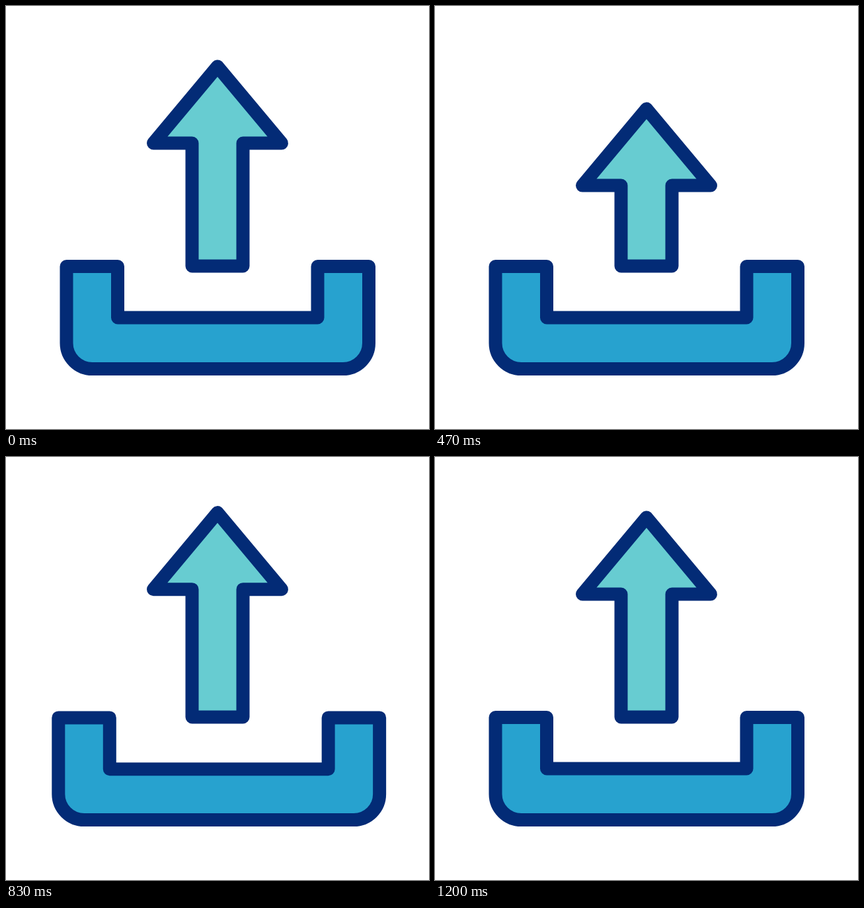
An HTML page with a canvas that plays this animation: 640x640 px, repeating every 1.5 s.

```html
<!DOCTYPE html>
<html lang="en">
<head>
<meta charset="utf-8">
<title>Upload icon</title>
<style>
  html, body { margin: 0; width: 100%; height: 100%; overflow: hidden; background: #fff; }
  canvas { display: block; width: 640px; height: 640px; }
</style>
</head>
<body>
<canvas id="stage" width="640" height="640"></canvas>
<script>
const ctx = document.getElementById('stage').getContext('2d');
const LOOP = 1500;
const FPS = 30;
const NAVY = '#032b76', MINT = '#67ccd1', BLUE = '#27a2cf';

// Keys are [frame, value]; values ease in and out between keys.
const HEAD_SHIFT = [[0, 0], [11, 95.5], [20.95, -48.5], [29, 33], [36, 0]];
const TRAY_SPREAD = [[14, 0], [21, 1], [28, 0]];

const ease = x => x * x * (3 - 2 * x);

function valueAt(keys, frame) {
  if (frame <= keys[0][0]) return keys[0][1];
  for (let i = 1; i < keys.length; i++) {
    const [start, from] = keys[i - 1];
    const [end, to] = keys[i];
    if (frame <= end) return from + (to - from) * ease((frame - start) / (end - start));
  }
  return keys[keys.length - 1][1];
}

function paint(fill) {
  ctx.closePath();
  ctx.fillStyle = fill;
  ctx.fill();
  ctx.stroke();
}

function drawArrow(shift) {
  const tip = 91.5 + shift, shoulder = 207.5 + shift, base = 393.5;
  ctx.beginPath();
  ctx.moveTo(320, tip);
  ctx.lineTo(417, shoulder);
  ctx.lineTo(358.5, shoulder);
  ctx.lineTo(358.5, base);
  ctx.lineTo(281.5, base);
  ctx.lineTo(281.5, shoulder);
  ctx.lineTo(223, shoulder);
  paint(MINT);
}

function drawTray(spread) {
  const left = 91.5 - 31 * spread, right = 549 + 41 * spread;
  const top = 394 + spread, floor = 471.5 + 2 * spread, bottom = 549;
  const post = 77.5, radius = 39;
  ctx.beginPath();
  ctx.moveTo(left, top);
  ctx.lineTo(left + post, top);
  ctx.lineTo(left + post, floor);
  ctx.lineTo(right - post, floor);
  ctx.lineTo(right - post, top);
  ctx.lineTo(right, top);
  ctx.arcTo(right, bottom, left, bottom, radius);
  ctx.arcTo(left, bottom, left, top, radius);
  paint(BLUE);
}

function render(now) {
  // Hold each pose for one frame; the small offset matches 10 ms timing.
  const frame = Math.floor(((now % LOOP) + 3.4) * FPS / 1000);
  ctx.fillStyle = '#fff';
  ctx.fillRect(0, 0, 640, 640);
  ctx.strokeStyle = NAVY;
  ctx.lineWidth = 20;
  ctx.lineJoin = 'round';
  drawTray(valueAt(TRAY_SPREAD, frame));
  drawArrow(valueAt(HEAD_SHIFT, frame));
}

const origin = performance.now();
function tick() {
  render(performance.now() - origin);
  requestAnimationFrame(tick);
}
tick();
</script>
</body>
</html>
```
